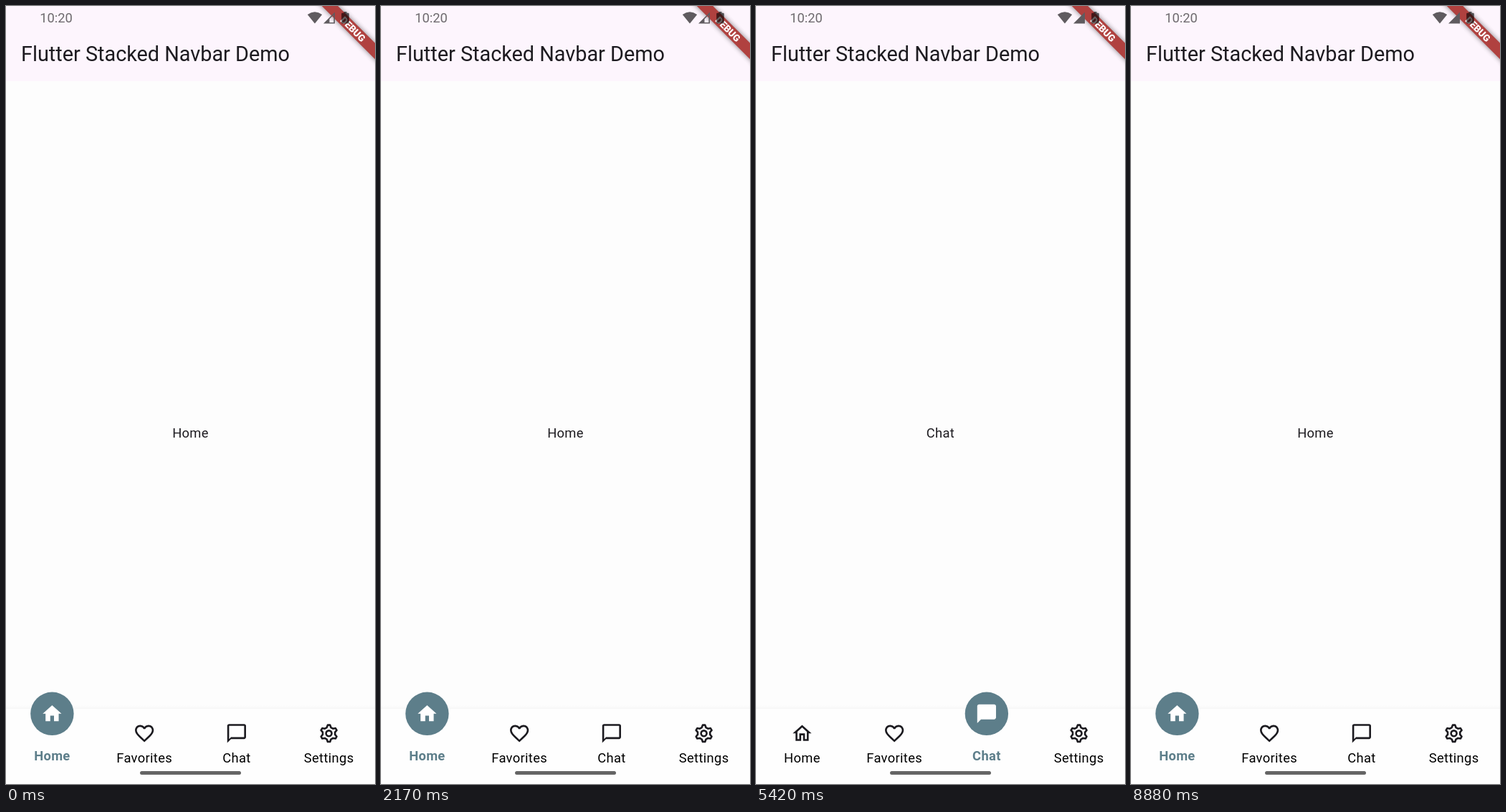
Write an HTML page that moves like this. It is 515 px wide and 1087 px high and loops after 8930 ms.

```html
<!DOCTYPE html>
<html lang="en">
<head>
<meta charset="utf-8">
<title>Stacked navbar</title>
<style>
  html, body { margin: 0; width: 100%; height: 100%; overflow: hidden; background: #fdfdfd; }
  svg { display: block; width: 100%; height: 100%; font-family: Roboto, sans-serif; }
  .label { font-size: 18.35px; letter-spacing: .33px; text-anchor: middle; }
</style>
</head>
<body>
<svg viewBox="0 0 515 1087">
  <defs>
    <linearGradient id="edge" x1="0" y1="0" x2="0" y2="1">
      <stop offset="0" stop-opacity="0"/>
      <stop offset="1" stop-opacity=".025"/>
    </linearGradient>
    <filter id="soft" x="-20%" y="-100%" width="140%" height="300%">
      <feGaussianBlur stdDeviation="3.6"/>
    </filter>
  </defs>

  <rect width="515" height="1087" fill="#fdfdfd"/>
  <rect width="515" height="105" fill="#fdf5fd"/>
  <text x="21" y="77" font-size="28.83" fill="#1d1b20">Flutter Stacked Navbar Demo</text>
  <text id="page" class="label" x="257.5" y="602.5" fill="#1d1b20"></text>

  <rect y="977" width="515" height="5" fill="url(#edge)"/>
  <rect y="982" width="515" height="105" fill="#fefefe"/>
  <g id="bar"></g>
  <rect x="187" y="1069" width="141" height="5" rx="2.5" fill="#656565"/>

  <g transform="translate(484.3 32.3) rotate(45)">
    <rect x="-70" y="-7.9" width="140" height="15.8" opacity=".5" filter="url(#soft)"/>
    <rect x="-70" y="-7.9" width="140" height="15.8" fill="#b0413f"/>
    <text y="4.8" font-size="13.4" font-weight="900" text-anchor="middle" fill="#fff">DEBUG</text>
  </g>

  <text x="47.2" y="22.5" font-size="18.3" fill="#6e6a6e">10:20</text>
  <g fill="#5f5b5f">
    <path d="M431 24.5L420.8 12Q431 4.6 441.2 12Z"/>
    <path id="weak" fill-rule="evenodd" d="M443 24.5L459 8.5V24.5ZM451.5 18.2V22.9H457.4V12.3Z"/>
    <path id="full" d="M443 24.5L459 8.5V24.5Z"/>
  </g>
  <path d="M471.5 8H475.5V9.8H477.5Q478.8 9.8 478.8 11V23.3Q478.8 24.5 477.5 24.5H469.5Q468.2 24.5 468.2 23.3V11Q468.2 9.8 469.5 9.8H471.5Z" fill="#000" opacity=".62"/>
</svg>

<script>
const LOOP = 8930, MOVE = 260;
const ACCENT = '#5d7e8a', INK = '#1b1a1f';
const SCALE = 1.31, LOW = 1016.3, HIGH = 988.8;

// Hexagonal cog outline: four points per tooth, repeated every 60 degrees.
function cogPath() {
  const tooth = [[-2.2, -6.3], [-1.25, -8.9], [1.25, -8.9], [2.2, -6.3]];
  const pts = [];
  for (let k = 0; k < 6; k++) {
    const c = Math.cos(k * Math.PI / 3), s = Math.sin(k * Math.PI / 3);
    for (const [x, y] of tooth)
      pts.push((12 + x * c - y * s).toFixed(2) + ' ' + (12 + x * s + y * c).toFixed(2));
  }
  return 'M' + pts.join('L') + 'Z';
}

const shape = (d, extra = '') => `<path d="${d}" fill-rule="evenodd" ${extra}/>`;
const house = 'M12 3L2 12h3v8h6v-6h2v6h6v-8h3L12 3z';
const heart = 'M12 21.35l-1.45-1.32C5.4 15.36 2 12.28 2 8.5 2 5.42 4.42 3 7.5 3c1.74 0 3.41.81 4.5 2.09C13.09 3.81 14.76 3 16.5 3 19.58 3 22 5.42 22 8.5c0 3.78-3.4 6.86-8.55 11.54L12 21.35z';
const heartHole = 'M12.1 18.55l-.1.1-.1-.1C7.14 14.24 4 11.39 4 8.5 4 6.5 5.5 5 7.5 5c1.54 0 3.04.99 3.57 2.36h1.87C13.46 5.99 14.96 5 16.5 5c2 0 3.5 1.5 3.5 3.5 0 2.89-3.14 5.74-7.9 10.05z';
const bubble = 'M20 2H4c-1.1 0-2 .9-2 2v18l4-4h14c1.1 0 2-.9 2-2V4c0-1.1-.9-2-2-2z';
const line = 'fill="none" stroke-width="2" stroke-linejoin="round"';
const cog = cogPath();

const items = [
  { name: 'Home',
    outline: shape('M12 5.69l5 4.5V18h-2v-6H9v6H7v-7.81z' + house),
    solid: shape('M10 20v-6h4v6h5v-8h3L12 3 2 12h3v8z') },
  { name: 'Favorites', outline: shape(heart + heartHole), solid: shape(heart) },
  { name: 'Chat', outline: shape(bubble + 'M20 16H6l-2 2V4h16z'), solid: shape(bubble) },
  { name: 'Settings',
    outline: shape(cog, `${line} stroke="${INK}"`) + `<circle cx="12" cy="12" r="3" ${line} stroke="${INK}"/>`,
    solid: shape(cog, 'stroke="#fff" stroke-width="2" stroke-linejoin="round"') +
      `<circle cx="12" cy="12" r="3.6" fill="${ACCENT}"/>` }
];

// Selected tab over time.
const taps = [[0, 0], [2250, 1], [3900, 2], [6460, 3], [7850, 0]];
const SIGNAL_AT = 2250;

const $ = id => document.getElementById(id);
const icon = (body, fill) =>
  `<g transform="scale(${SCALE}) translate(-12 -12)" fill="${fill}">${body}</g>`;

$('bar').innerHTML = items.map((it, i) => `<g transform="translate(${515 * (i + .5) / 4} 0)">
  <g>${icon(it.outline, INK)}</g>
  <g><circle r="30.2" fill="${ACCENT}"/>${icon(it.solid, '#fff')}</g>
  <text class="label" fill="#000">${it.name}</text>
  <text class="label" fill="${ACCENT}" font-weight="700">${it.name}</text>
</g>`).join('');
const tabs = [...$('bar').children].map(g => [...g.children]);

const ease = x => x < .5 ? 4 * x ** 3 : 1 - (2 - 2 * x) ** 3 / 2;

function place(el, y, alpha) {
  el.setAttribute('transform', `translate(0 ${y.toFixed(2)})`);
  el.setAttribute('opacity', alpha.toFixed(3));
}

function draw(t) {
  let n = taps.length - 1;
  while (taps[n][0] > t) n--;
  const [start, now] = taps[n];
  const before = n ? taps[n - 1][1] : now;
  const p = ease(Math.min(1, (t - start) / MOVE));

  tabs.forEach(([outline, disc, plain, bold], i) => {
    const a = i === now ? (before === now ? 1 : p) : i === before ? 1 - p : 0;
    const y = LOW + (HIGH - LOW) * a;
    const base = 1057 - 3 * a;
    place(outline, y, 1 - a);
    place(disc, y, a);
    place(plain, base, 1 - a);
    place(bold, base, a);
  });

  $('page').textContent = items[now].name;
  const strong = t >= SIGNAL_AT;
  $('weak').setAttribute('opacity', strong ? 0 : 1);
  $('full').setAttribute('opacity', strong ? 1 : 0);
}

const origin = performance.now();
function tick() {
  draw((performance.now() - origin) % LOOP);
  requestAnimationFrame(tick);
}
tick();
</script>
</body>
</html>
```
